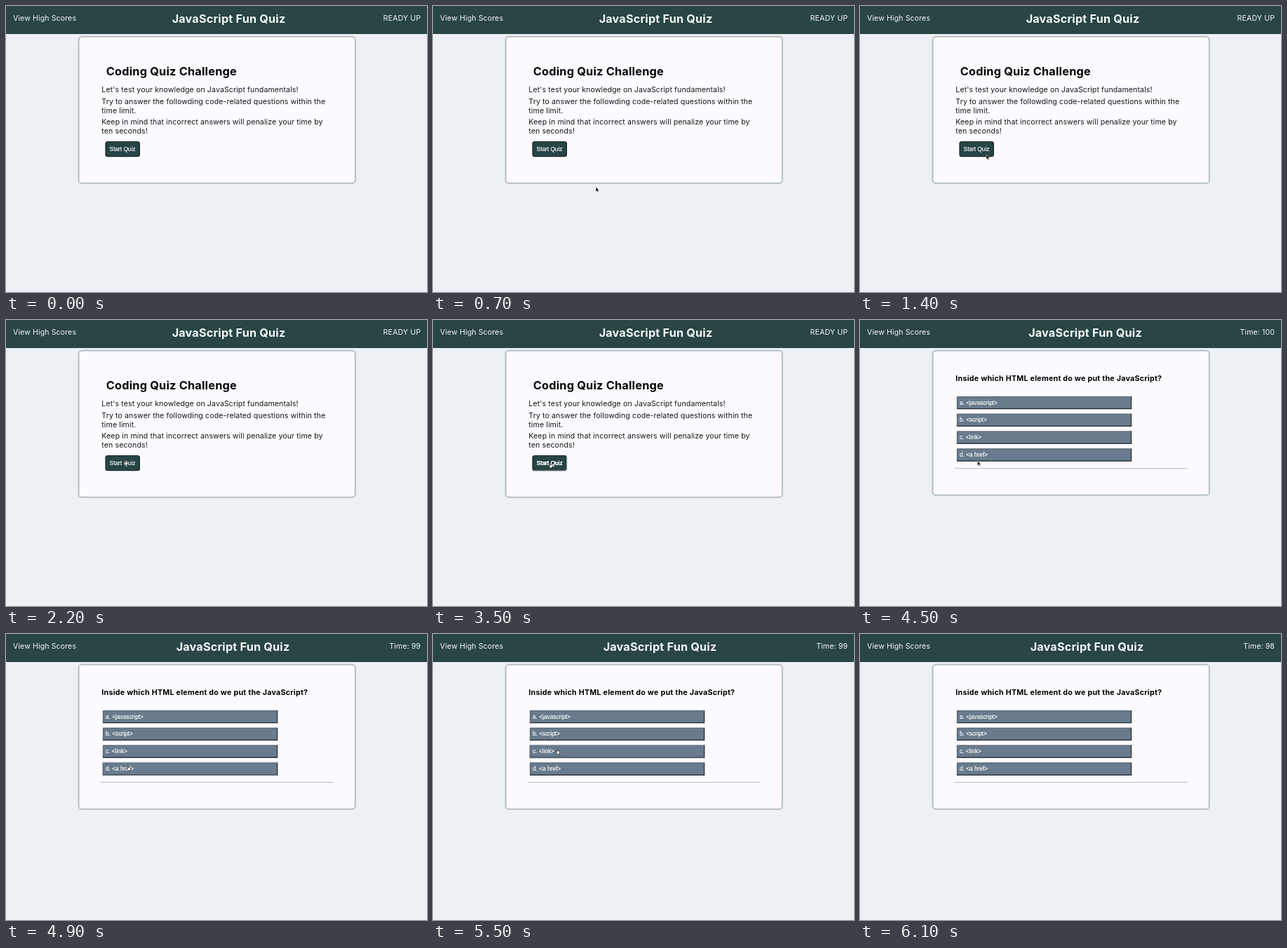
These frames come from a looping animation (600 px wide and 408 px high, 6700 ms). An HTML page:

```html
<!DOCTYPE html>
<html lang="en">
<head>
<meta charset="utf-8">
<title>JavaScript Fun Quiz</title>
<style>
  html, body { margin: 0; width: 100%; height: 100%; overflow: hidden; background: #edf1f6; }
  svg { display: block; width: 600px; height: 408px; }

  text { font: 400 10.6px Inter, "Open Sans", sans-serif; letter-spacing: .1px; fill: #161616; }
  .bar text { fill: #f3f7f7; }
  .bar .title { font-size: 16.2px; font-weight: 700; letter-spacing: .2px; text-anchor: middle; }
  .right { text-anchor: end; }
  .heading { font-size: 16.3px; font-weight: 700; letter-spacing: .22px; fill: #000; }
  .question { font-size: 10.7px; font-weight: 700; letter-spacing: .24px; fill: #000; }
  .label { font: 400 8.3px "Liberation Sans", Arial, sans-serif; letter-spacing: 0; fill: #fff; stroke: #fff; stroke-width: .15; }
  .card { fill: #fdfbff; stroke: #98a3a5; stroke-width: .8; filter: drop-shadow(0 .6px .9px rgba(30, 50, 50, .45)); }
  .option { fill: #697b8d; }
  .lit { fill: none; stroke: #535e68; stroke-width: .9; }
  .dark { fill: none; stroke: #23292f; stroke-width: 1.2; }
  .glow { fill: none; stroke: #b9c2ca; stroke-width: 1; }

  /* One shared clock: 100 ms is 1.4925 % of the loop */
  .a { animation: 6.7s step-end infinite; }
  .intro { animation-name: intro; }
  .quiz { animation-name: quiz; }
  .title { animation-name: title; }
  .t100 { animation-name: t100; }
  .t99 { animation-name: t99; }
  .t98 { animation-name: t98; }
  .press { animation-name: press; }
  .over-c { animation-name: over-c; }
  .over-d { animation-name: over-d; }
  .arrow { animation-name: arrow; }
  .hand { animation-name: hand; }
  .pointer { animation: move 6.7s linear infinite; }

  @keyframes intro { 0% { visibility: visible } 56.716%, 100% { visibility: hidden } }
  @keyframes quiz { 0% { visibility: hidden } 56.716%, 100% { visibility: visible } }
  @keyframes title {
    0% { transform: none }
    56.716% { transform: translateX(3.5px) }
    71.642%, 100% { transform: translateX(6px) }
  }
  @keyframes t100 { 0% { opacity: 0 } 56.716% { opacity: 1 } 71.642%, 100% { opacity: 0 } }
  @keyframes t99 { 0% { opacity: 0 } 71.642% { opacity: 1 } 86.567%, 100% { opacity: 0 } }
  @keyframes t98 { 0% { opacity: 0 } 86.567%, 100% { opacity: 1 } }
  @keyframes press { 0% { opacity: 0 } 52.239% { opacity: 1 } 56.716%, 100% { opacity: 0 } }
  @keyframes over-c { 0% { opacity: 0 } 82.09% { opacity: 1 } 83.582%, 100% { opacity: 0 } }
  @keyframes over-d { 0% { opacity: 0 } 71.642% { opacity: 1 } 74.627%, 100% { opacity: 0 } }
  @keyframes arrow {
    0% { opacity: 0 } 2.985% { opacity: 1 } 22.388% { opacity: 0 }
    56.716% { opacity: 1 } 70.149% { opacity: 0 }
    85.075% { opacity: 1 } 89.552%, 100% { opacity: 0 }
  }
  @keyframes hand {
    0% { opacity: 0 } 22.388% { opacity: 1 } 56.716% { opacity: 0 }
    70.149% { opacity: 1 } 85.075%, 100% { opacity: 0 }
  }
  @keyframes move {
    0%, 2.985% { transform: translate(300px, 330px) }
    10.448%, 11.94% { transform: translate(232px, 258px) }
    20.896% { transform: translate(180px, 212px) }
    25.373%, 35.821% { transform: translate(169px, 200px) }
    40.299%, 65.672% { transform: translate(166px, 204px) }
    73.134%, 74.627% { transform: translate(173px, 188px) }
    76.119%, 80.597% { transform: translate(175px, 169px) }
    83.582%, 85.075% { transform: translate(177px, 160px) }
    89.552%, 100% { transform: translate(190px, 20px) }
  }
</style>
</head>
<body>
<svg viewBox="0 0 600 408">
  <defs>
    <g id="option">
      <rect class="option" width="249" height="18"/>
      <path class="lit" d="M.4 18V.4H249"/>
      <path class="dark" d="M0 17.6H248.6V0"/>
    </g>
    <rect id="glow" class="glow" x="-.5" y="-.5" width="250" height="19"/>
  </defs>

  <rect width="600" height="408" fill="#edf1f6"/>

  <g class="bar">
    <rect width="600" height="40" fill="#294545"/>
    <text x="10" y="21.3">View High Scores</text>
    <text class="a title" x="317.5" y="23.6">JavaScript Fun Quiz</text>
    <text class="a right intro" x="591" y="21.3">READY UP</text>
    <text class="a right t100" x="591" y="21.3">Time: 100</text>
    <text class="a right t99" x="591" y="21.3">Time: 99</text>
    <text class="a right t98" x="591" y="21.3">Time: 98</text>
  </g>

  <g class="a intro">
    <rect class="card" x="104" y="44" width="393.4" height="208.5" rx="4"/>
    <text class="heading" x="142.7" y="99">Coding Quiz Challenge</text>
    <text x="136.3" y="123.2">Let's test your knowledge on JavaScript fundamentals!</text>
    <text x="136.3" y="140.2">Try to answer the followding code-related questions within the</text>
    <text x="136.3" y="152.6">time limit.</text>
    <text x="136.3" y="169.4">Keep in mind that incorrect answers will penalize your time by</text>
    <text x="136.3" y="181.8">ten seconds!</text>
    <rect x="142" y="193.5" width="48.4" height="21.2" rx="3" fill="#284545" stroke="#152626" stroke-width="1.2"/>
    <path class="a press" d="M143 215H188Q190.7 215 190.7 212V195" fill="none" stroke="#a3adae" stroke-width="1.2"/>
    <text class="label" x="147.6" y="206.6">Start Quiz</text>
    <text class="label a press" x="147.9" y="206.6">Start Quiz</text>
  </g>

  <g class="a quiz">
    <rect class="card" x="104" y="44" width="393.4" height="205.5" rx="4"/>
    <text class="question" x="136.3" y="87">Inside which HTML element do we put the JavaScript?</text>
    <use href="#option" x="138" y="109"/>
    <use href="#option" x="138" y="133.8"/>
    <use href="#option" x="138" y="158.6"/>
    <use href="#option" x="138" y="183.5"/>
    <use class="a over-c" href="#glow" x="138" y="158.6"/>
    <use class="a over-d" href="#glow" x="138" y="183.5"/>
    <text class="label" x="142" y="120.6">a. &lt;javascript&gt;</text>
    <text class="label" x="142" y="145.4">b. &lt;script&gt;</text>
    <text class="label" x="142" y="170.2">c. &lt;link&gt;</text>
    <text class="label" x="142" y="195.1">d. &lt;a href&gt;</text>
    <path d="M134.5 211.7H466.5" stroke="#b3b3b7"/>
  </g>

  <g class="pointer">
    <path class="a arrow" d="M0 0V7L1.6 5.6L2.7 8L3.9 7.4L2.8 5.2H5Z" fill="#111" stroke="#fff" stroke-width=".5"/>
    <path class="a hand" d="M0 .6Q.6 -.3 1.2 .6L1.8 2.5L4 3Q4.8 3.3 4.6 4.5L4 6.9H1.1L-1.1 4.4Q-1.3 3.5 -.3 3.8L.6 4.3Z" fill="#fff" stroke="#111" stroke-width=".7"/>
  </g>
</svg>
</body>
</html>
```
